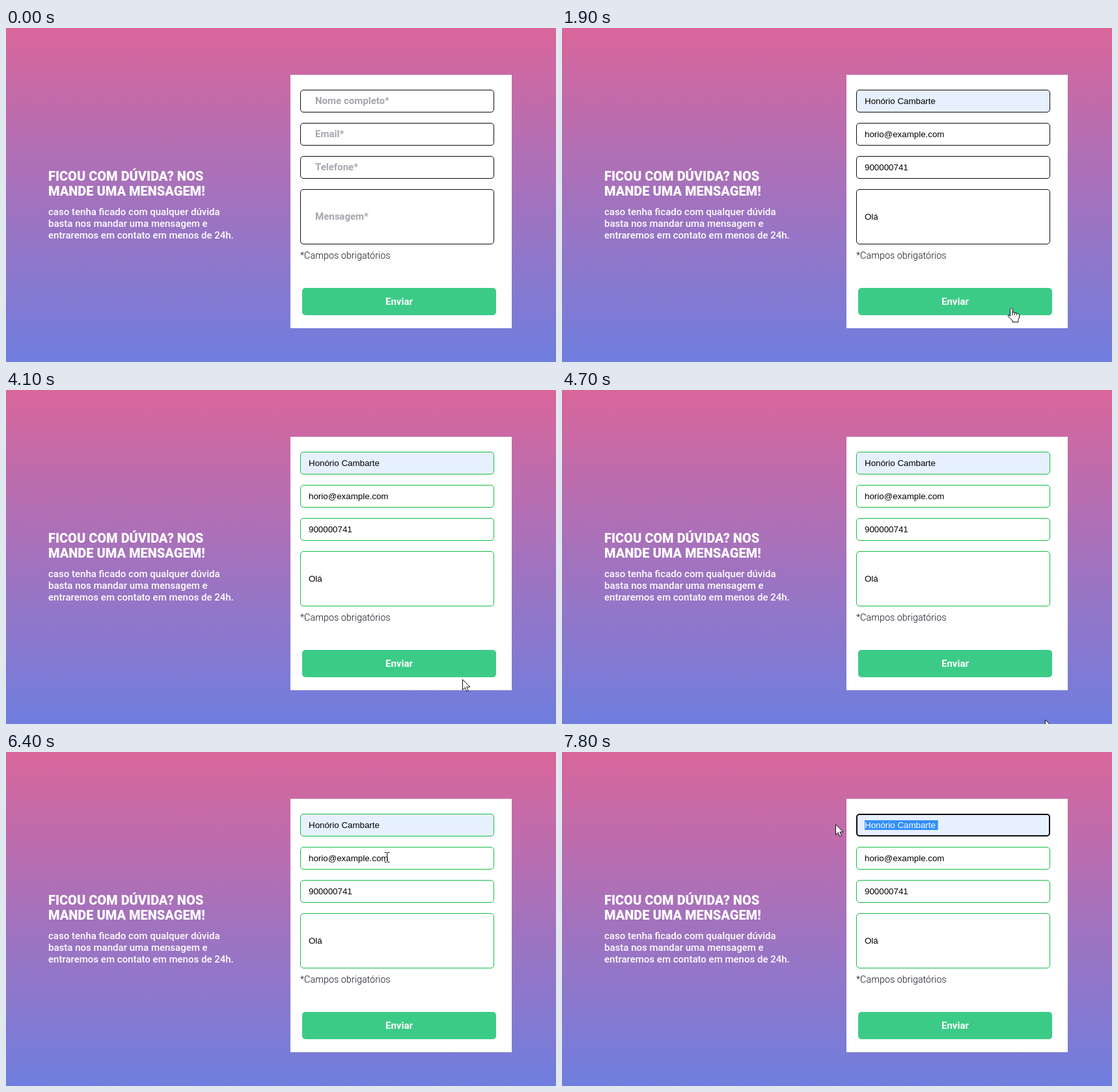
An HTML page that plays this animation: 845 by 514 pixels, repeating every 8000 ms.

```html
<!DOCTYPE html>
<html lang="pt">
<head>
<meta charset="utf-8">
<title>Formulário de contato</title>
<style>
  html, body { margin: 0; width: 100%; height: 100%; overflow: hidden; }
  svg { display: block; width: 845px; height: 514px; font: 15px Roboto, sans-serif; }
  text { white-space: pre; }
  .title { font-weight: 900; font-size: 20px; }
  .lead { font-weight: 500; }
  .hint { font-weight: 700; fill: #a9a4ae; }
  .note { font-weight: 300; font-size: 14.4px; fill: #17101f; }
  .typed { font: 13.333px "Liberation Sans", Arial, sans-serif; }
</style>
</head>
<body>
<svg viewBox="0 0 845 514" xmlns="http://www.w3.org/2000/svg">
  <defs>
    <linearGradient id="sky" x2="0" y2="1">
      <stop stop-color="#d9669b"/><stop offset="1" stop-color="#6f7edf"/>
    </linearGradient>
    <clipPath id="selectionClip"><rect id="clipBox" y="105" height="15"/></clipPath>
  </defs>
  <rect width="845" height="514" fill="url(#sky)"/>
  <g fill="#fff">
    <text class="title" x="65" y="235">FICOU COM DÚVIDA? NOS</text>
    <text class="title" x="65" y="258">MANDE UMA MENSAGEM!</text>
    <text class="lead" x="65" y="288">caso tenha ficado com qualquer dúvida</text>
    <text class="lead" x="65" y="306">basta nos mandar uma mensagem e</text>
    <text class="lead" x="65" y="324">entraremos em contato em menos de 24h.</text>
  </g>
  <rect x="437" y="72" width="340" height="390" fill="#fff"/>
  <g id="fields"></g>
  <g id="selection">
    <rect id="selectionBox" y="105" height="15" fill="#338ffc"/>
    <text id="selectedText" class="typed" x="465" y="117" fill="#fff" clip-path="url(#selectionClip)"></text>
  </g>
  <text class="note" x="452" y="355">*Campos obrigatórios</text>
  <rect x="455" y="400" width="298" height="42" rx="5" fill="#3ccb87"/>
  <text x="604" y="426" font-weight="700" fill="#fff" text-anchor="middle">Enviar</text>
  <circle id="press" r="12" fill="#f5ee3c" opacity=".72"/>
  <g id="cursor" stroke="#111" stroke-linejoin="round">
    <path id="arrow" d="M.5.5v16l3.7-3.5 2.6 6 2.6-1.1-2.6-5.9h5.2z" fill="#fff"/>
    <g id="hand" fill="#fff">
      <path d="M-1.5.5h2l1 1V6.5h2l1.5 1h2l1.5 1h1.5l1.5 1.5V15l-1.5 3v3.5h-9V19L-5.5 13v-2h2l1 1.5V1.5z"/>
      <path d="M1.5 6.5V11M4.5 7.5V11M7.5 8.5V11" fill="none"/>
    </g>
    <path id="beam" d="M-3.5-7.5h3l1 1 1-1h3M-3.5 7.5h3l1-1 1 1h3M.5-6.5v13" fill="none"/>
  </g>
</svg>
<script>
const LOOP = 8000, STEP = 100;
const FILLED = 500, APPEAR = 1500, SUBMIT = 2900, VALID = 3100, FOCUS = 7100, RELEASE = 7800;
const INK = '#0b0b0f', GREEN = '#12bd43';

const el = id => document.getElementById(id);
const show = (node, on) => node.setAttribute('display', on ? 'inline' : 'none');
const set = (node, attrs) => Object.entries(attrs).forEach(([k, v]) => node.setAttribute(k, v));
const between = (t, a, b) => t >= a && t < b;

const easeIn = power => p => p ** power;
const easeOut = power => p => 1 - (1 - p) ** power;
const linear = p => p;

// Each move continues from where the previous one stopped; "via" bends its path.
const ENTRY = [728, 493];
const moves = [
  { from: 1500, to: 2200, goal: [686, 423], ease: easeOut(2.5) },
  { from: 4000, to: 4700, goal: [742, 507], ease: easeOut(2) },
  { from: 4900, to: 5800, goal: [568, 275], via: [590, 168], ease: easeOut(1.1) },
  { from: 5800, to: 6600, goal: [606, 160], via: [556, 146], ease: linear },
  { from: 6700, to: 7100, goal: [579, 112], ease: linear },
  { from: 7100, to: 7600, goal: [420, 111], ease: easeIn(2) }
];

const fields = [
  ['Nome completo*', 'Honório Cambarte '],
  ['Email*', 'horio@example.com'],
  ['Telefone*', '900000741'],
  ['Mensagem*', 'Olá']
].map(([hint, value], i, all) => (
  { hint, value, y: 95 + 51 * i, h: i === all.length - 1 ? 85 : 35 }
));

function add(tag, attrs, content = '') {
  const node = document.createElementNS('http://www.w3.org/2000/svg', tag);
  set(node, attrs);
  node.textContent = content;
  return el('fields').appendChild(node);
}

for (const f of fields) {
  const baseline = Math.floor(f.y + f.h / 2 + 5);
  f.box = add('rect', {});
  f.hintText = add('text', { class: 'hint', x: 475, y: baseline }, f.hint);
  f.valueText = add('text', { class: 'typed', x: 465, y: baseline }, f.value);
}
el('selectedText').textContent = fields[0].value;

function pointerAt(t) {
  let point = ENTRY;
  for (const { from, to, goal, via, ease } of moves) {
    if (t <= from) break;
    const p = ease(Math.min(1, (t - from) / (to - from))), q = 1 - p;
    point = point.map((a, i) => {
      const bend = via ? via[i] : (a + goal[i]) / 2;
      return a * q * q + 2 * bend * p * q + goal[i] * p * p;
    });
  }
  return point.map(Math.round);
}

function pointerShape(x, y, dragging) {
  if (dragging) return 'beam';
  if (between(x, 455, 753) && between(y, 400, 442)) return 'hand';
  const overField = between(x, 452, 750) && fields.some(f => between(y, f.y, f.y + f.h));
  return overField ? 'beam' : 'arrow';
}

function drawFields(t) {
  const filled = t >= FILLED;
  fields.forEach((f, i) => {
    const focused = i === 0 && t >= FOCUS;
    const w = focused ? 2 : 1;
    set(f.box, {
      x: 452 + w / 2, y: f.y + w / 2, width: 298 - w, height: f.h - w, rx: 5 - w / 2,
      fill: filled && i === 0 ? '#e6f0ff' : '#fff',
      stroke: focused || t < VALID ? INK : GREEN, 'stroke-width': w
    });
    show(f.hintText, !filled);
    show(f.valueText, filled);
  });
}

// The selection runs from the character edge nearest the pointer to the end.
function drawSelection(t, x) {
  show(el('selection'), t >= FOCUS);
  if (t < FOCUS) return;
  const text = el('selectedText');
  const edges = Array.from(fields[0].value, (_, i) => text.getStartPositionOfChar(i).x);
  const end = text.getEndPositionOfChar(edges.length - 1).x;
  const gap = edge => Math.abs(edge - x - 3);
  const start = [...edges, end].reduce((a, b) => gap(b) < gap(a) ? b : a);
  for (const id of ['selectionBox', 'clipBox']) set(el(id), { x: start, width: end - start });
}

function drawPointer(t, x, y) {
  const dragging = between(t, FOCUS, RELEASE);
  const shape = pointerShape(x, y, dragging);
  for (const name of ['arrow', 'hand', 'beam']) show(el(name), name === shape);
  show(el('cursor'), t >= APPEAR);
  show(el('press'), dragging || between(t, SUBMIT, VALID));
  set(el('cursor'), { transform: `translate(${x} ${y})` });
  set(el('press'), { cx: x - 1, cy: y });
}

function render(time) {
  const t = Math.floor((time % LOOP) / STEP) * STEP;
  const [x, y] = pointerAt(t);
  drawFields(t);
  drawSelection(t, x);
  drawPointer(t, x, y);
}

const began = performance.now();
function tick() {
  render(performance.now() - began);
  requestAnimationFrame(tick);
}
tick();
</script>
</body>
</html>
```
